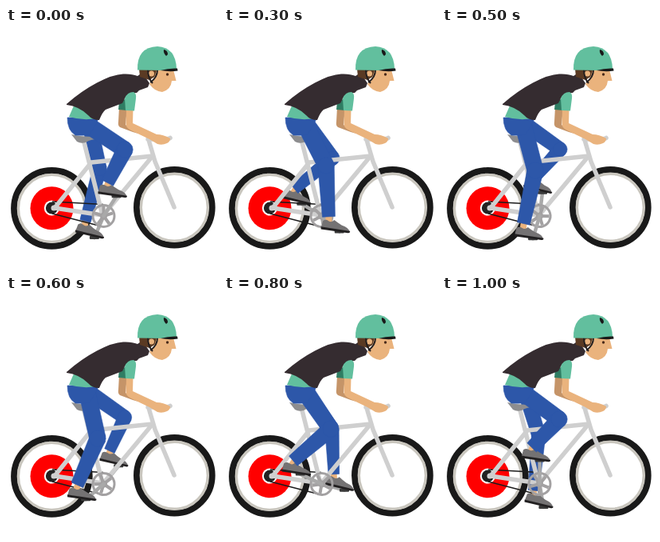
These frames come from a looping animation (266x300 px, 1100 ms). An HTML page:

```html
<!DOCTYPE html>
<html lang="en">
<head>
<meta charset="utf-8">
<title>Cyclist</title>
<style>
  html, body { margin: 0; width: 100%; height: 100%; overflow: hidden; background: #fff; }
  svg { display: block; width: 266px; height: 300px; }
  .line { fill: none; stroke: #cfcfcf; stroke-width: 5.5; stroke-linecap: round; stroke-linejoin: round; }
  .tyre { fill: #fff; stroke: #191919; stroke-width: 8; }
  .rim { fill: none; stroke: #c9c6be; stroke-width: 3.4; }
  .chain { fill: none; stroke: #1c1c1c; stroke-width: 1.3; }
  .crank { stroke: #a9a9a9; stroke-width: 4.5; stroke-linecap: round; }
  .pedal { fill: #3a3a3a; }
  .pants { fill: #2d57a9; stroke: #2d57a9; stroke-width: .6; }
  .skin { fill: #eab37d; }
  .ankle { stroke: #eab37d; stroke-width: 8; }
  .green { fill: #62bf9e; }
  .dark { fill: #352c30; }
</style>
</head>
<body>
<svg viewBox="0 0 266 300">
  <defs>
    <g id="shoe">
      <path fill="#747273" d="M-18-1-17-9Q-14-12-10-10-6-8-3-12 2-9 7-7 17-5 18 0Z"/>
      <path fill="#211f20" d="M-18.500-1.500 18.500-1Q19 1.500 16 1.500H-18Z"/>
    </g>
    <g id="wheel">
      <circle class="tyre" r="47.300"/>
      <circle class="rim" r="42"/>
    </g>
  </defs>

  <use href="#wheel" x="57.400" y="225.400"/>
  <circle cx="57.500" cy="225.300" r="27" fill="#f00"/>
  <circle cx="57.300" cy="225" r="9.500" fill="#fff"/>
  <circle cx="57.500" cy="225" r="7.600" fill="#222"/>
  <use href="#wheel" x="211.300" y="224.300"/>

  <g id="far"></g>

  <path class="chain" d="M58 217 122 220.500M58 232 120 248"/>
  <g class="line">
    <path d="M97 139 121 234 61 225 107 168 184 160 122 234"/>
    <path d="M178 139H192Q204 139 206 137.500M179 140 187 167 211 224"/>
  </g>
  <circle cx="60" cy="225" r="3.500" fill="#cfcfcf"/>
  <path fill="#8d8d8f" d="M82 133Q98 137 114 135 118 137 115 139 106 139 100 143 94 145 89 142Z"/>
  <g id="ring" fill="none" stroke="#a3a1a2">
    <circle r="13.500" stroke-width="3"/>
    <circle r="4" fill="#a3a1a2"/>
  </g>

  <g id="near"></g>

  <path class="pants" d="M77 112 117 111 113 120 105 133Q97 135 87 134 77 128 77 112Z"/>

  <!-- far arm, shirt, vest -->
  <path fill="#c59468" d="M142 99H152L150 121 166 132 159 130 143 124Q140 122 141 117Z"/>
  <path fill="#2f7d63" d="M142 92 154 87 152 103 141 102Z"/>
  <path class="green" d="M86 95 79 111Q96 116 114 113L118 101Z"/>
  <path class="dark" d="M76 95Q94 79 114 68.500 134 58 147 57.500 158 57 165 60L171 56 180 69 178 74 167 78 164 81Q153 81 149 88L146 94 125 102Q121 105 117 115 108 115 103 109 92 98 76 96Z"/>
  <path class="skin" d="M151 101H159.500L159 119 189 133Q197 133 206 138 206 142 202 144 196 147 190 145L180 139 157 128Q150 125 150.500 119Z"/>
  <path class="green" d="M149 88Q152 80 160 80 164 82 163 88L161 103.500 150 103Z"/>

  <!-- head -->
  <path fill="#5a3a23" d="M167 51H191L188 60 180 65 168 61Z"/>
  <path class="skin" d="M189 52H210L213.500 66H208Q207 77 196 80 186 79 180 70L186 62Z"/>
  <circle class="skin" cx="182.500" cy="57" r="3.500"/>
  <path d="M178 52Q178 63 184 69M190 52Q190 62 181 68" fill="none" stroke="#231f20" stroke-width="2"/>
  <circle cx="202.500" cy="58" r="1.700" fill="#4a2b1b"/>
  <path class="green" d="M165 52.500Q164 24 190 23 213 24 214 51L200 53Z"/>
  <path fill="#191919" d="M194 53Q204 50 215 50.500L215.500 53.500Q205 55 194 53ZM198 27Q203 28 203 33L201 35Q197 31 198 27Z"/>
</svg>

<script>
const STEPS = 11, STEP_MS = 100, START = -57;
const hub = [122.5, 235], radius = 29.5;
const knees = [
  [149, 152], [144, 160], [136, 167], [128, 172], [121, 175], [117, 178],
  [115, 178], [125, 173], [134, 166], [141, 159], [147, 154]
];
const near = {
  el: document.getElementById('near'), phase: 0, hip: [102, 121], knee: [0, 0],
  foot: [-5, -2], ankle: [-8, -11], tilt: 8, width: [10.5, 10.2, 8]
};
const far = {
  el: document.getElementById('far'), phase: 5.2, hip: [105, 121], knee: [1, -2],
  foot: [-6, -4], ankle: [-7, -11], tilt: 13, width: [9.5, 8.7, 6.8]
};
const ring = document.getElementById('ring');

for (let i = 0; i < 5; i++) {
  ring.insertAdjacentHTML('beforeend', `<path d="M0 0V-12" stroke-width="4" transform="rotate(${i * 72})"/>`);
}

const mix = (a, b, t) => a.map((v, i) => v + (b[i] - v) * t);
const add = (a, b) => a.map((v, i) => v + b[i]);
const pt = p => p.map(v => v.toFixed(2)).join(' ');

function kneeAt(phase) {
  const i = Math.floor(phase);
  return mix(knees[i % STEPS], knees[(i + 1) % STEPS], phase - i);
}

// Segment whose half width goes from wa to wb
function taper(a, b, wa, wb) {
  const dx = b[0] - a[0], dy = b[1] - a[1], len = Math.hypot(dx, dy);
  const side = (p, w) => pt([p[0] - dy / len * w, p[1] + dx / len * w]);
  return `M${side(a, wa)}L${side(b, wb)}L${side(b, -wb)}L${side(a, -wa)}Z`;
}

function drawLeg(leg, step) {
  const phase = step + leg.phase;
  const angle = (START + phase * 360 / STEPS) * Math.PI / 180;
  const pedal = add(hub, [radius * Math.cos(angle), radius * Math.sin(angle)]);
  const sole = add(pedal, leg.foot);
  const ankle = add(sole, leg.ankle);
  const knee = add(kneeAt(phase), leg.knee);
  const cuff = mix(ankle, knee, 0.08);
  const [hipW, kneeW, cuffW] = leg.width;
  leg.el.innerHTML =
    `<path class="crank" d="M${pt(hub)}L${pt(pedal)}"/>
     <rect class="pedal" x="${pedal[0] - 6}" y="${pedal[1] - 2}" width="12" height="4" rx="1"/>
     <path class="ankle" d="M${pt(mix(ankle, knee, 0.15))}L${pt(add(ankle, [0, 5]))}"/>
     <use href="#shoe" transform="translate(${pt(sole)}) rotate(${leg.tilt})"/>
     <path class="pants" d="${taper(leg.hip, knee, hipW, kneeW)}"/>
     <path class="pants" d="${taper(knee, cuff, kneeW, cuffW)}"/>
     <circle class="pants" cx="${knee[0]}" cy="${knee[1]}" r="${kneeW}"/>`;
}

let shown = -1;
function draw(now) {
  const step = Math.floor(now / STEP_MS) % STEPS;
  if (step !== shown) {
    shown = step;
    drawLeg(far, step);
    drawLeg(near, step);
    ring.setAttribute('transform', `translate(${pt(hub)}) rotate(${step * 360 / STEPS})`);
  }
}

const start = performance.now();
function tick() {
  draw(performance.now() - start);
  requestAnimationFrame(tick);
}
draw(0);
requestAnimationFrame(tick);
</script>
</body>
</html>
```
